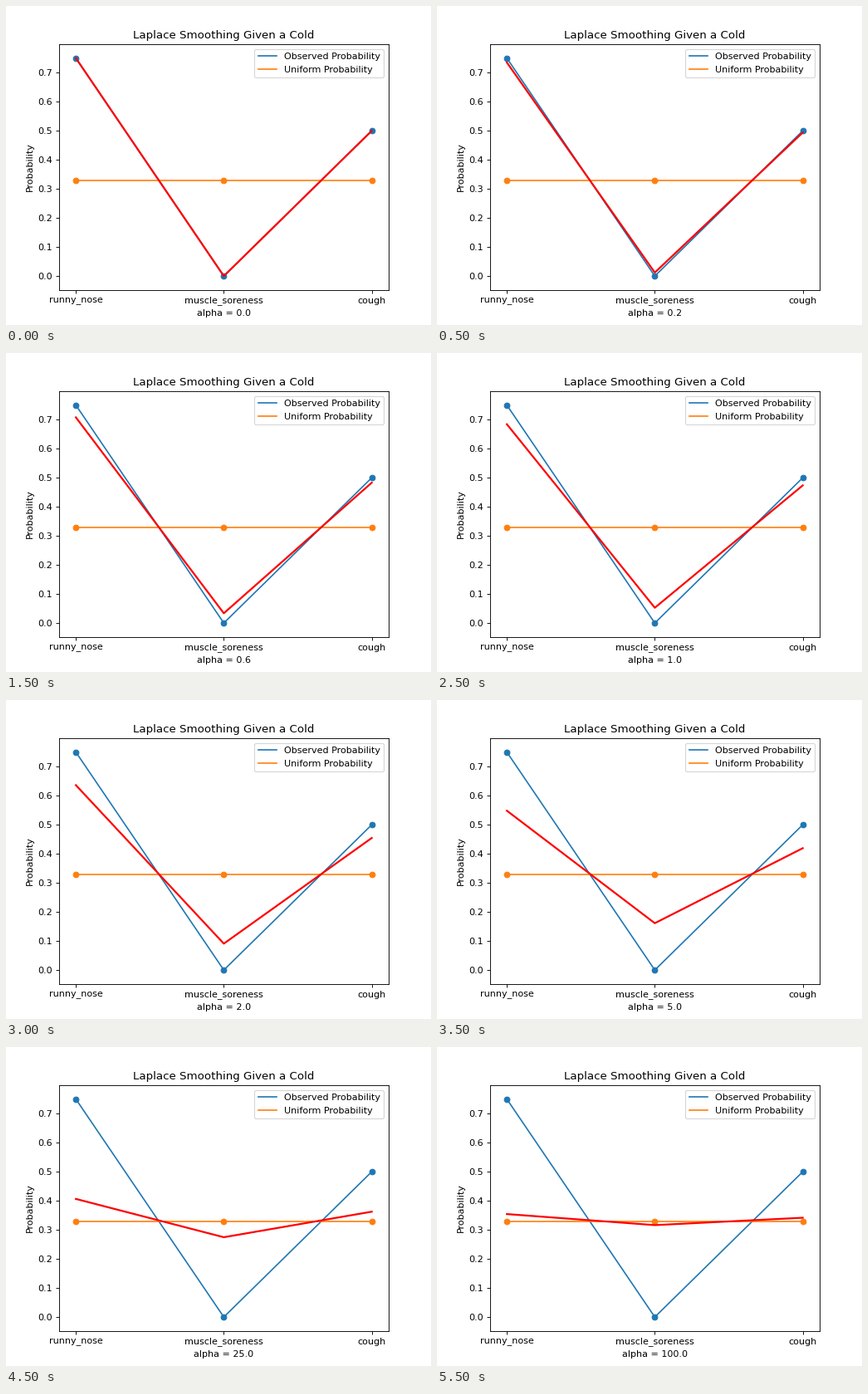
A matplotlib script that plays this animation: 512x384 px, repeating every 6000 ms.

```python
import matplotlib.pyplot as plt
import numpy as np
from matplotlib.animation import FuncAnimation

plt.rcParams["font.family"] = "DejaVu Sans"

SYMPTOMS = ["runny_nose", "muscle_soreness", "cough"]
PATIENTS = 16
counts = np.array([12, 0, 8])
observed = counts / PATIENTS
uniform = np.full(3, 0.33)
alphas = [0.0, 0.2, 0.4, 0.6, 0.8, 1.0, 2.0, 5.0, 10.0, 25.0, 50.0, 100.0]
x = np.arange(3)

fig, ax = plt.subplots(figsize=(6.4, 4.8), dpi=80)
for values, color, label in [
    (observed, "C0", "Observed Probability"),
    (uniform, "C1", "Uniform Probability"),
]:
    ax.plot(x, values, color=color, label=label)
    ax.scatter(x, values, color=color)
(smoothed_line,) = ax.plot(x, observed, color="red", linewidth=2)

ax.set_xlim(-0.1133, 2.1133)
ax.set_ylim(-0.0477, 0.7977)
ax.set_xticks(x, SYMPTOMS)
ax.set_yticks(np.arange(8) / 10)
ax.set_title("Laplace Smoothing Given a Cold")
ax.set_ylabel("Probability")
ax.legend(loc="upper right")


def smooth(alpha):
    return (counts + alpha) / (PATIENTS + alpha * len(counts))


def update(frame):
    alpha = alphas[frame]
    smoothed_line.set_ydata(smooth(alpha))
    ax.set_xlabel(f"alpha = {alpha:.1f}")
    return (smoothed_line,)


anim = FuncAnimation(fig, update, frames=len(alphas), interval=500,
                     repeat=True, repeat_delay=0)
plt.show()
```
